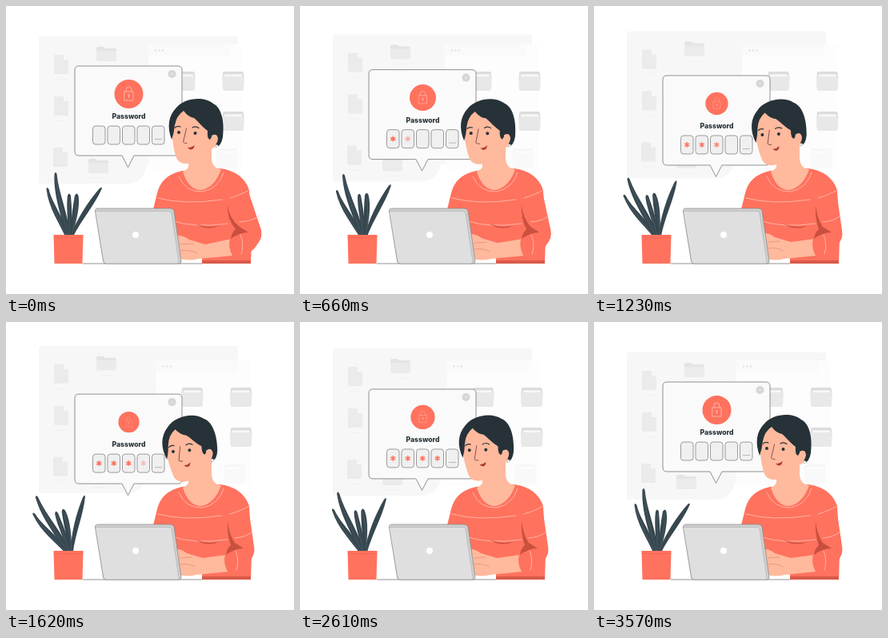
These frames come from a looping animation (360x360 px, 3.6 s). An HTML page:

```html
<!DOCTYPE html>
<html lang="en">
<head>
<meta charset="utf-8">
<title>Password</title>
<style>
  html, body { margin: 0; width: 100%; height: 100%; overflow: hidden; background: #fff; }
  svg { display: block; width: 100vw; height: 100vh; }
  .line { fill: none; stroke-linecap: round; stroke-linejoin: round; }
  .stripe { stroke: #ffc4b8; stroke-width: .8; }
  .label { font: 800 8.600px Inter, "Open Sans", sans-serif; text-anchor: middle; fill: #263238; }
</style>
</head>
<body>
<svg viewBox="0 0 360 360">
  <defs>
    <g id="file">
      <path d="M1 0H12L18 6V23Q18 24 17 24H1Q0 24 0 23V1Q0 0 1 0Z" fill="#ebebeb"/>
      <path d="M12 0V6H18Z" fill="#f8f8f8"/>
      <path d="M2 30.500H16" stroke="#f0f0f0"/>
    </g>
    <g id="folder">
      <path d="M0 2Q0 0 2 0H9L11 2H23Q25 2 25 4V16H0Z" fill="#e4e4e4"/>
      <path d="M0 5H25V16Q25 18 23 18H2Q0 18 0 16Z" fill="#ebebeb"/>
      <path d="M5 24H20" stroke="#f0f0f0"/>
    </g>
    <g id="bigFolder">
      <path d="M1 2Q1 0 3 0H25Q27 0 27 3V21H1Z" fill="#dcdcdc"/>
      <path d="M3 3.500H25V8H3Z" fill="#f8f8f8"/>
      <path d="M0 6H28L27 22Q27 24 25 24H4Q1 24 1 22Z" fill="#e8e8e8"/>
    </g>
    <path id="star" class="line" d="M0-2.700V2.700M-2.400-1.400L2.400 1.400M-2.400 1.400L2.400-1.400" stroke="#ff725e" stroke-width="1.600"/>
  </defs>

  <g id="files">
    <path d="M44 38H287Q290 38 290 41V200H176Q172 222 150 222H44Q41 222 41 219V41Q41 38 44 38Z" fill="#f7f7f7"/>
    <use href="#file" x="60" y="61"/>
    <use href="#file" x="60" y="113"/>
    <use href="#file" x="59" y="177"/>
    <use href="#folder" x="113" y="51"/>
    <use href="#folder" x="103" y="191"/>
  </g>

  <g id="window">
    <path d="M178 48H295V205H178Z" fill="#fdfdfd"/>
    <path d="M178 48H280V62H178Z" fill="#fafafa"/>
    <g fill="#e2e2e2">
      <circle cx="187" cy="55.500" r="1.200"/><circle cx="191.500" cy="55.500" r="1.200"/><circle cx="196" cy="55.500" r="1.200"/>
    </g>
    <use href="#bigFolder" x="209" y="82"/>
    <use href="#bigFolder" x="270" y="82"/>
    <use href="#bigFolder" x="270" y="132"/>
    <use href="#bigFolder" x="262" y="178" opacity=".15"/>
  </g>

  <g id="bubble">
    <path d="M91 75H215Q220 75 220 80V182Q220 187 215 187H160L152.500 201.500L145 187H91Q86 187 86 182V80Q86 75 91 75Z" fill="#fafafa" stroke="#858585" stroke-width=".9"/>
    <circle cx="207.500" cy="85" r="5" fill="#d6d6d6"/>
    <path d="M206 83.500L209 86.500M209 83.500L206 86.500" stroke="#f0f0f0" stroke-width=".8"/>
    <circle id="badge" cx="153.500" cy="110" fill="#ff725e"/>
    <g id="lock" class="line" stroke="#ffb9ad" stroke-width=".9">
      <path d="M-5.500-3H5.500V8H-5.500ZM-3.500-3V-5Q-3.500-9 0-9T3.500-5V-3M0 2V4.500"/>
      <circle cy="1.500" r="1"/>
    </g>
    <text class="label" x="153.500" y="141">Password</text>
    <g id="slots"></g>
    <path d="M186 166.500H195" stroke="#aaa" stroke-width=".8"/>
  </g>

  <path d="M96 322H245" stroke="#666" stroke-width=".7"/>

  <path d="M220 206C200 211 192 220 188 238L183 258L212 314H245V322H306L307 290L304 230Q296 207 268 203Z" fill="#ff725e"/>
  <path d="M245 318H306V322H245Z" fill="#d95a49"/>
  <g class="line stripe">
    <path d="M190 240Q222 249 270 242"/>
    <path d="M207 268Q235 278 277 272"/>
    <path d="M216 213Q224 233 246 232Q266 228 272 208"/>
  </g>
  <path d="M237 272Q252 282 268 274Q253 279 237 272Z" fill="#c9503f"/>

  <path d="M229 178L228 201Q226 205 221 207Q228 230 244 230Q261 227 269 204Q256 203 257 186V168Z" fill="#ffb99d"/>

  <g id="head">
    <path d="M208 140C206 158 209 178 213 190Q217 198 227 197Q244 196 254 181L264 174Q270 162 262 153L250 126H216Z" fill="#ffb99d"/>
    <path d="M207 167C201 151 203 137 213 127C223 115 247 112 259 122C271 128 273 148 271 164Q269 175 262 177Q265 163 258 162L255 167Q251 166 252 156C245 151 239 143 235 140Q228 139 222 131Q213 137 211 149Q210 159 207 167Z" fill="#263238"/>
    <path d="M257 162Q264 158 265 166Q264 174 258 174Z" fill="#ffb99d"/>
    <circle cx="263.500" cy="175" r="1.500" fill="#fff" stroke="#bbb" stroke-width=".4"/>
    <g fill="#263238"><circle cx="216" cy="158" r="2"/><circle cx="236.500" cy="159" r="2"/></g>
    <path class="line" d="M211.500 152Q214 149.500 218 151M233 152Q237 149.500 241 152.500" stroke="#263238" stroke-width="1.200"/>
    <path class="line" d="M225.500 153L221.500 170Q223 172 226 171.500" stroke="#7d4a42" stroke-width=".9"/>
    <path d="M227 176.500Q231 178 235.500 174Q235.500 179 231 179.500Q228.500 179 227 176.500Z" fill="#b23c34"/>
  </g>

  <path id="hand" fill="#ffb99d"/>
  <path id="sleeve" fill="#ff725e"/>
  <path id="fold" fill="#c9503f"/>
  <path id="bands" class="line stripe"/>
  <path id="fingers" class="line" stroke="#e08a72" stroke-width=".7"/>

  <path d="M115 253H205Q209 253 210 256L219 319Q219 322 216 322H125Q122 322 121.500 319L111.500 257Q111 253 115 253Z" fill="#cfcfcf" stroke="#858585" stroke-width=".7"/>
  <path d="M114 256.500H204Q206.500 256.500 207 259L216 318Q216 321.500 213 321.500H126Q123 321.500 122.500 318L112.500 259Q112 256.500 114 256.500Z" fill="#dfdfdf"/>
  <path class="line" d="M113 256.500H204Q206.500 256.500 207 259L216 320" stroke="#aaa" stroke-width=".6"/>
  <circle cx="162" cy="286" r="4" fill="#fff"/>

  <g id="leaves">
    <g fill="#37474f">
      <path d="M76 290C71 268 59 238 60.500 210Q62 206 63.500 210C66 236 79 262 80 290Z"/>
      <path d="M75 290C67 272 53 252 50.500 229Q51 225 53.500 229C58 248 73 264 78 290Z"/>
      <path d="M77 290C78 268 75 252 77 237Q79 232 81 237C82 252 84 268 80 290Z"/>
      <path d="M79 290C82 268 83 252 86 237Q88.500 232 90.500 237C93 252 87 272 82 290Z"/>
      <path d="M80 290C87 268 103 244 117 228Q121 225 119.500 229C110 250 95 266 83 290Z"/>
    </g>
    <path class="line" d="M62 214Q67 250 78 288M52 232Q60 258 76 288M79 239L79 288M88 239Q89 262 82 288" stroke="#52636b" stroke-width=".6"/>
  </g>
  <path d="M59.500 286H96.500L95.500 322H60.500Z" fill="#ff725e"/>

<!-- pot rim -->
  <path d="M60 289Q78 291 96 289" class="line" stroke="#ee6452" stroke-width=".8"/>
</svg>

<script>
const LOOP = 3600;
const $ = id => document.getElementById(id);
const put = (id, name, value) => $(id).setAttribute(name, value);
const clamp = v => Math.max(0, Math.min(1, v));
const ramp = (t, from, span) => clamp((t - from) / span);

$('slots').innerHTML = [0, 1, 2, 3, 4].map(i => {
  const x = 108.5 + 18.5 * i;
  const star = i < 4 ? `<use class="mark" href="#star" x="${x + 7.75}" y="161.5"/>` : '';
  return `<rect x="${x}" y="150" width="15.5" height="23" rx="3.5" fill="#f0f0f0" stroke="#858585" stroke-width=".8"/>${star}`;
}).join('');
const marks = [...document.querySelectorAll('.mark')];

// q: 1 = elbow out, 0 = resting
function drawArm(q) {
  const e = 9 * q, c = 6 * q, h = 3 * q;
  put('sleeve', 'd', `M274 208Q298 211 303 232L${310 + e} 280Q${312 + e} 290 ${305 + e} 298Q${297 + e} 313 ${277 + c} 312Q${271 + c} 301 ${274 + c} 291L${288 + c} 284L278 250Z`);
  put('fold', 'd', `M277 249Q279 266 ${286 + c} 276L${297 + c} 283Q${286 + c} 283 ${275 + c} 291Q${276 + c} 283 ${281 + c} 279Q276 266 277 249Z`);
  put('bands', 'd', `M280 240Q294 236 304 230M${286 + c} 270Q${300 + e} 269 ${308 + e} 262M${287 + c} 286Q${292 + c} 298 ${288 + c} 310`);
  put('hand', 'd', `M${276 + c} 291L${246 + h} ${295 + h}L${226 + h} ${289 + h}Q${216 + h} ${282 + h} 211 ${285 + h}L214 314Q${222 + h} 320 ${238 + h} 316L${278 + c} 312Z`);
  put('fingers', 'd', `M218 ${295 + h}L${232 + h} ${294 + h}M218 ${303 + h}Q${228 + h} ${301 + h} ${236 + h} ${306 + h}`);
}

function render(t) {
  const p = (1 - Math.cos(2 * Math.PI * t / LOOP)) / 2;
  put('files', 'transform', `translate(0 ${-8.5 * p})`);
  put('window', 'transform', `translate(${10 * p} 0)`);
  put('bubble', 'transform', `translate(0 ${15.5 * p})`);
  put('badge', 'r', 18 - 5 * p);
  put('lock', 'transform', `translate(153.5 110) scale(${1 - .28 * p})`);
  put('lock', 'opacity', 1 - .6 * p);
  put('head', 'transform', `rotate(${-7.5 * p} 243 215)`);
  put('leaves', 'transform', `rotate(${-19 * p} 78 287)`);
  drawArm((1 + Math.cos(Math.PI * ramp(t, 0, 1140))) / 2);
  const out = 1 - ramp(t, 3270, 240);
  marks.forEach((m, i) => m.setAttribute('opacity', Math.min(out, ramp(t, 60 + 490 * i, 230))));
}

const start = performance.now();
function tick() {
  render((performance.now() - start) % LOOP);
  requestAnimationFrame(tick);
}
render(0);
requestAnimationFrame(tick);
</script>
</body>
</html>
```
